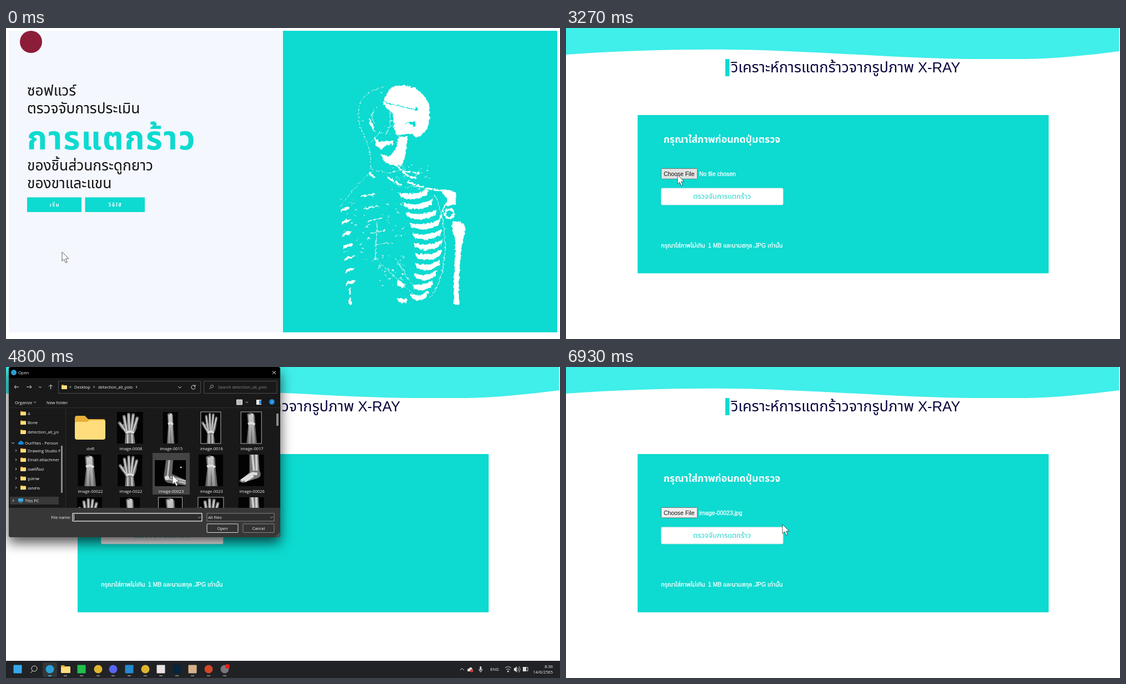
Recreate the animation shown at these times as an HTML page. Size 998 px wide and 561 px high, loop 6960 ms.

```html
<!DOCTYPE html>
<html lang="th">
<head>
<meta charset="utf-8">
<title>X-ray fracture check</title>
<style>
html, body { margin: 0; width: 100%; height: 100%; overflow: hidden; background: #fff; }
svg.stage { display: block; width: 100vw; height: 100vh; }
text { font-family: "Liberation Sans", "Noto Sans Thai", "Noto Sans", sans-serif; }
.ui text { font-family: "Open Sans", "Noto Sans Thai", "Noto Sans", sans-serif; font-size: 7.5px; fill: #f2f2f2; }
.mid { text-anchor: middle; }
.end { text-anchor: end; }
.teal { fill: #0ddad0; }
.line { fill: none; stroke: #ddd; stroke-width: 1; }
.bone { fill: none; stroke: #fff; stroke-linecap: round; }

/* Hard switches */
.cut { animation: 6960ms step-end infinite; }
#home { animation-name: home; }
#upload { animation-name: upload; }
#wave { animation-name: wave; }
#hover { animation-name: hover; }
#empty { animation-name: empty; }
#chosen { animation-name: chosen; }
#focus { animation-name: focus; }
#pick { animation-name: pick; }
#name { animation-name: name; }
#marked { animation-name: marked; }
#press { animation-name: press; }
#caption { animation-name: caption; }
#arrow { animation-name: arrow; }
#hand { animation-name: hand; }
#beam { animation-name: beam; }
@keyframes home { 0% { opacity: 1 } 21.55% { opacity: 0 } }
@keyframes upload { 0% { opacity: 0 } 21.55% { opacity: 1 } }
@keyframes wave { 0% { opacity: 0 } 31.03% { opacity: 1 } }
@keyframes hover { 0% { opacity: 0 } 40% { opacity: 1 } 51.7% { opacity: 0 } }
@keyframes empty { 0% { opacity: 1 } 93.1% { opacity: 0 } }
@keyframes chosen { 0% { opacity: 0 } 93.1% { opacity: 1 } }
@keyframes focus { 0% { opacity: 1 } 69% { opacity: 0 } }
@keyframes pick { 0% { opacity: 0 } 66% { opacity: .5 } 69% { opacity: 1 } 88% { opacity: .4 } }
@keyframes name { 0% { opacity: 0 } 69% { opacity: 1 } }
@keyframes marked { 0% { opacity: 0 } 88% { opacity: 1 } }
@keyframes press { 0% { opacity: 0 } 83.6% { opacity: 1 } }
@keyframes caption { 0% { opacity: 1 } 89.7% { opacity: 0 } }
@keyframes arrow { 0% { opacity: 1 } 12.6% { opacity: 0 } 31.03% { opacity: 1 } 52.6% { opacity: 0 } 63% { opacity: 1 } }
@keyframes hand { 0% { opacity: 0 } 12.6% { opacity: 1 } 31.03% { opacity: 0 } }
@keyframes beam { 0% { opacity: 0 } 52.6% { opacity: 1 } 63% { opacity: 0 } }

/* Smooth motion */
#cursor { animation: travel 6960ms ease-in-out infinite; }
#dialog { animation: dialog 6960ms linear infinite; transform-origin: 249px 153px; filter: drop-shadow(0 10px 11px rgba(0, 0, 0, .68)); }
#title { animation: title 6960ms step-end infinite; }
#taskbar { animation: taskbar 6960ms ease-out infinite; }
@keyframes travel {
  0%, 4.3% { transform: translate(101px, 404px) }
  13.6%, 31.03% { transform: translate(87px, 325px) }
  40.9%, 51.7% { transform: translate(201px, 265px) }
  56%, 62.1% { transform: translate(194px, 271px) }
  68.2%, 75% { transform: translate(300px, 195px) }
  79.3% { transform: translate(347px, 219px) }
  84%, 100% { transform: translate(390px, 284px) }
}
@keyframes dialog {
  0%, 51.72% { opacity: 0; transform: scale(.96) }
  53.5%, 89.7% { opacity: 1; transform: none }
  90.5% { opacity: .9; transform: scale(.996) }
  92.2%, 100% { opacity: 0; transform: scale(.96) }
}
@keyframes title { 0% { transform: none } 89.7% { transform: translateX(-12px) } }
@keyframes taskbar {
  0%, 50% { transform: translateY(32px) }
  51.5%, 88.6% { transform: none }
  90.4%, 92.1% { transform: translateY(30px) }
  92.2%, 100% { transform: translateY(32px) }
}
</style>
</head>
<body>
<svg class="stage" viewBox="0 0 998 561">
<defs>
  <filter id="rough" x="-5%" y="-5%" width="110%" height="110%" color-interpolation-filters="sRGB">
    <feTurbulence type="fractalNoise" baseFrequency=".2" numOctaves="3" seed="4"/>
    <feDisplacementMap in="SourceGraphic" scale="6" xChannelSelector="R" yChannelSelector="G"/>
  </filter>
  <linearGradient id="xray" x1="0" y1="0" x2="0" y2="57" gradientUnits="userSpaceOnUse">
    <stop offset="0" stop-color="#d0d0d0"/><stop offset="1" stop-color="#8d8d8d"/>
  </linearGradient>
  <clipPath id="files"><path d="M108 74H494V254H108Z"/></clipPath>
  <symbol id="folder" viewBox="0 0 55 43" preserveAspectRatio="none">
    <path d="M0 4Q0 0 4 0H18L24 6H51Q55 6 55 10V30H0Z" fill="#e9b03a"/>
    <path d="M0 14Q0 11 4 11H22L27 8H51Q55 8 55 12V39Q55 43 51 43H4Q0 43 0 39Z" fill="#ffdd7c"/>
  </symbol>
  <symbol id="xhand" viewBox="0 0 40 57" preserveAspectRatio="none">
    <path d="M12 57L13 39Q8 32 8 22L31 21Q31 32 26 39L28 57Z" fill="#777"/>
    <path d="M10 30L4 20M13 24L11 8M18 23L18 4M23 23L25 5M28 25L31 11" stroke="#777" stroke-width="5" stroke-linecap="round" fill="none"/>
    <path d="M16.500 57V41M23.500 57L23 41M13 34L5 21M15 34L11 9M19 33L18 5M22 33L25 6M25 34L31 12" stroke="#ccc" stroke-width="2.200" stroke-linecap="round" fill="none"/>
    <path d="M14 38Q20 33 26 38" stroke="#ddd" stroke-width="4" fill="none"/>
  </symbol>
  <symbol id="xarm" viewBox="0 0 40 57" preserveAspectRatio="none">
    <path d="M11 57L14 25L12 4Q20-2 27 6L28 26L31 57Z" fill="#666"/>
    <path d="M17 57L18 24L17 5M25 57L23 27L22 3" stroke="url(#xray)" stroke-width="5" fill="none"/>
    <path d="M14 22Q21 17 27 23" stroke="#ddd" stroke-width="4" fill="none"/>
  </symbol>
  <symbol id="xelbow" viewBox="0 0 56 47" preserveAspectRatio="none">
    <path d="M20 0H33L31 25L56 36V46L24 41Q14 37 17 23Z" fill="#666"/>
    <path d="M26 0L23 28M22 33L56 42M28 30L56 38" stroke="#bbb" stroke-width="3" fill="none"/>
    <circle cx="22" cy="32" r="4" fill="#ddd"/><circle cx="47" cy="13" r="1.5" fill="#ddd"/>
  </symbol>
  <symbol id="xfoot" viewBox="0 0 46 57" preserveAspectRatio="none">
    <path d="M20 0H36L38 29Q43 38 36 42L8 51L1 48L20 32Z" fill="#777"/>
    <path d="M25 0L28 29M32 0L33 29" stroke="#ccc" stroke-width="4" fill="none"/>
    <path d="M34 35L25 34L5 47M27 38L11 48" stroke="#ddd" stroke-width="5" fill="none"/>
  </symbol>
</defs>

<g id="home" class="cut">
  <path d="M5 5H499V549H5Z" fill="#f4f7fe"/>
  <path class="teal" d="M499 5H993V549H499Z"/>
  <circle cx="45" cy="25" r="20" fill="#8c1d39"/>
  <g font-size="26.3" fill="#111">
    <text x="38" y="122">ซอฟแวร์</text>
    <text x="38" y="154">ตรวจจับการประเมิน</text>
    <text class="teal" x="38" y="219" font-size="58" font-weight="700" letter-spacing="1.9">การแตกร้าว</text>
    <text x="38" y="257">ของชิ้นส่วนกระดูกยาว</text>
    <text x="38" y="289">ของขาและแขน</text>
  </g>
  <path class="teal" d="M38 305.5H136V332H38ZM142.500 305.5H250V332H142.500Z"/>
  <g class="mid" font-size="9" font-weight="700" letter-spacing="1.8" fill="#fff">
    <text x="88" y="322">เริ่ม</text><text x="197" y="322">วิธีใช้</text>
  </g>
  <g id="skeleton" filter="url(#rough)">
    <g fill="#fff">
      <path d="M681 128L692 110Q701 103 716 103Q750 107 761 137Q765 160 761 177Q752 194 738 198L731 188Q740 178 737 168Q722 168 712 180L700 184Q697 160 694 152Q686 146 679 137Z"/>
      <path d="M707 196L723 195Q723 226 713 247Q698 251 681 241L674 226L690 232Q704 222 707 196Z"/>
      <path d="M664 197L672 205L696 203L698 209L684 212L676 220L666 211ZM700 180L726 172L740 180L738 190L704 193Z"/>
      <path d="M653 162Q660 168 665 188L657 178Z"/>
      <path d="M784 293Q800 290 812 298L810 318L790 322L795 308Z"/>
      <path d="M804 350Q827 344 828 366Q822 382 820 402Q815 450 816 499H806Q807 450 809 402Q812 382 804 365Z"/>
      <path d="M705 455L719 463L716 469L704 464ZM705 486L722 489V496L706 494Z"/>
    </g>
    <path d="M681 134L735 147" stroke="#0ddad0" stroke-width="1.4"/>
    <circle cx="739" cy="146" r="3" class="teal"/>
    <circle cx="799" cy="335" r="8" class="bone" stroke-width="4"/>
    <g class="bone" stroke-width=".9">
      <path d="M682 107Q650 111 638 135Q631 160 640 183Q650 202 655 224L658 253" stroke-dasharray="5 3 2 3"/>
      <path d="M692 150Q696 180 683 192M662 150Q656 160 664 172M676 184Q668 194 658 206"/>
      <path d="M662 258Q640 272 622 296L604 320M657 254L690 262L718 254" stroke-dasharray="6 4"/>
      <path d="M772 300Q794 350 790 412Q785 462 764 486M669 350L665 418M672 422L742 488M705 420L735 470" stroke-dasharray="22 2"/>
    </g>
    <g class="bone" stroke-width="3">
      <path d="M703 248L722 266L739 271M716 258L748 263M724 278L752 288L788 294M688 270L712 284M655 262L663 269M790 320L780 350" stroke-dasharray="12 5"/>
      <path d="M620 470V497" stroke-width="4" stroke-dasharray="10 7"/>
    </g>
  </g>
</g>

<g id="upload" class="cut">
  <path d="M0 0H998V561H0Z" fill="#fff"/>
  <path id="wave" class="cut" d="M0 0H996.500V42C910 53 860 56 820 56H740C640 56 520 47 400 42C300 37 150 37 0 48Z" fill="#40eeea"/>
  <path class="teal" d="M287 56H294.500V87H287Z"/>
  <g fill="#09063f">
    <text x="297" y="80" font-size="27">วิเคราะห์การแตกร้าวจากรูปภาพ</text><text x="634" y="80" font-size="25.6">X-RAY</text>
  </g>
  <path class="teal" d="M129 157H869.500V442.500H129Z"/>
  <text class="mid" x="281" y="207" font-size="17.700" font-weight="700" fill="#fff">กรุณาใส่ภาพก่อนกดปุ่มตรวจ</text>
  <rect x="171.500" y="253.500" width="65" height="18.500" rx="1" fill="#efefef" stroke="#6b7474"/>
  <rect id="hover" class="cut" x="172" y="254" width="64" height="17.500" fill="#e2e2e2"/>
  <g font-size="10.4">
    <text x="176" y="266.500" fill="#111">Choose File</text>
    <g fill="#fff" stroke="#fff" stroke-width=".3">
      <text id="empty" class="cut" x="240" y="266.500">No file chosen</text>
      <text id="chosen" class="cut" x="240" y="266.500">image-00023.jpg</text>
      <text x="171" y="396" font-size="10.800">กรุณาใส่ภาพไม่เกิน</text><text x="256" y="396">1 MB</text>
      <text x="283" y="396" font-size="10.800">และนามสกุล</text><text x="337" y="396">.JPG</text>
      <text x="363" y="396" font-size="10.800">เท่านั้น</text>
    </g>
  </g>
  <rect x="171.500" y="289" width="219.500" height="30" rx="2" fill="#fff" stroke="#d5e7e7"/>
  <text class="mid" x="281" y="308" font-size="13.100" fill="#20d3cb">ตรวจจับการแตกร้าว</text>
</g>

<g id="taskbar" class="ui">
  <path d="M0 530H998V561H0Z" fill="#202225"/>
  <rect x="66" y="533" width="26" height="26" rx="3" fill="#34373a"/>
  <g id="apps"></g>
  <circle class="line" cx="51" cy="544" r="5" stroke-width="1.500"/><path class="line" d="M48 548L44 552" stroke-width="1.500"/>
  <use href="#folder" x="99" y="538" width="17" height="14"/>
  <circle cx="399" cy="540" r="4" fill="#f01818"/>
  <path class="line" d="M818 547L821.500 543.500L825 547M852 545Q852 549 855 549Q858 549 858 545M855 549V551M899 543Q904 538 910 543M901 546Q904 543 908 546M922 542Q924 545 922 549M924 540Q928 545 924 551"/>
  <rect x="853.500" y="540" width="3" height="7" rx="1.500" fill="#ddd"/>
  <path d="M831 548Q831 544 834 544Q837 539 840 544L841 549H832ZM915 543H917L920 540V551L917 548H915Z" fill="#ddd"/>
  <circle cx="839" cy="548" r="2.800" fill="#d83b3b"/><circle cx="904.500" cy="549" r="1.500" fill="#ddd"/>
  <rect class="line" x="932" y="542" width="8" height="6"/><path d="M931 541H937V549H931Z" fill="#ddd"/>
  <text class="mid" x="880" y="548">ENG</text>
  <text class="end" x="985" y="543">8:36</text><text class="end" x="985" y="553">14/6/2565</text>
</g>

<g id="dialog" class="ui">
  <rect x="5" y="0" width="489" height="307" rx="4" fill="#191919"/>
  <path d="M5 20V4Q5 0 9 0H490Q494 0 494 4V20Z" fill="#000"/>
  <path d="M5 254H494V303Q494 307 490 307H9Q5 307 5 303Z" fill="#373737"/>
  <g id="caption" class="cut">
    <circle cx="14" cy="10" r="5" fill="#2b9fd6"/>
    <path class="line" d="M480 7L486 13M486 7L480 13"/>
  </g>
  <text id="title" x="22" y="13">Open</text>
  <g class="line">
    <path d="M23 36H15M18 33L15 36L18 39M37 36H46M43 33L46 36L43 39M59 35L61.500 37.500L64 35M80.500 40V32M77 35.500L80.500 32L84 35.500M310 35L313 38L316 35M157.500 34L159.500 36L157.500 38M234 34L236 36L234 38"/>
    <path d="M340 34A3.600 3.600 0 1 0 341 37M341 32V35H338"/>
    <path d="M94.500 25.500H350.500V47.500H94.500ZM356.500 25.500H488V47.500H356.500Z" stroke="#4b4b4b"/>
    <circle cx="371" cy="35" r="2.500" stroke="#999"/><path d="M369 37L366 40" stroke="#999"/>
    <path d="M107.500 74V254M5 73.500H494" stroke="#2e2e2e"/>
    <path d="M50 62.500L52 64.500L54 62.500M432 62.500L434 64.500L436 62.500"/>
    <path d="M415.500 59H425.500V68H415.500Z" fill="#bbb"/>
  </g>
  <path d="M451 59H460V68H451Z" fill="#eee"/><path d="M456 60H460V67H456Z" fill="#2a8ad6"/>
  <circle cx="479" cy="63" r="5" fill="#1787d8"/><text class="mid" x="479" y="66">?</text>
  <use href="#folder" x="100" y="32" width="10" height="8"/>
  <text x="114" y="38">«</text><text x="123" y="39">Desktop</text><text x="166" y="39">detection_all_yolo</text>
  <text x="382" y="39" style="fill:#888">Search detection_all_yolo</text>
  <text x="16" y="66.500">Organize</text><text x="73" y="66.500">New folder</text>
  <path d="M7 234H95V248H7Z" fill="#383838"/>
  <g id="tree"></g>
  <path d="M23 140Q20 136 24 135.500Q26 131 30 135Q33 136 31 140Z" fill="#1689dc"/>
  <path d="M22 237H31V243H22ZM24 244H29V245H24Z" fill="#3ba5df"/>
  <text x="34" y="140">OurFiles - Person</text><text x="34" y="244">This PC</text>
  <path class="line" d="M10 136L12.500 138.500L15 136M12 239L14 241L12 243" stroke="#aaa"/>
  <path d="M99 142H102V227H99ZM487 84H491V106H487Z" fill="#8b8b8b"/>
  <path id="pick" class="cut" d="M264 155H331V230H264Z" fill="#707070"/>
  <g clip-path="url(#files)">
    <use href="#folder" x="124" y="88" width="55" height="43"/>
    <g id="shots"></g>
  </g>
  <text class="mid" x="152" y="150">ปกติ</text>
  <text class="end" x="117" y="273.500">File name:</text>
  <g class="line" stroke-width="1">
    <path d="M120 264H353V278H120ZM362 264H483V278H362Z" fill="#2d2d2d" stroke="#858585"/>
    <path d="M346 270L348.500 272.500L351 270M476 270L478.500 272.500L481 270" stroke="#aaa"/>
    <path id="focus" class="cut" d="M120 264H353V278H120ZM122.500 266V276" stroke="#fff"/>
    <rect x="362" y="283" width="56" height="15.500" rx="1" fill="#333" stroke="#e0e0e0"/>
    <rect id="press" class="cut" x="362" y="283" width="56" height="15.500" fill="#626262" stroke="#bbb"/>
    <rect x="427" y="283" width="56" height="15.500" rx="1" fill="#333" stroke="#888"/>
  </g>
  <path id="marked" class="cut" d="M121 266H168V276.500H121Z" fill="#0878d4"/>
  <text id="name" class="cut" x="121.500" y="273.500">image-00023</text>
  <text x="364" y="273.500">All files</text>
  <text class="mid" x="390" y="293.500">Open</text><text class="mid" x="455" y="293.500">Cancel</text>
  <path d="M487 305H493M490 302.500H493M492 300H493" stroke="#bbb" stroke-dasharray="1.500 1"/>
</g>

<g id="cursor">
  <path id="arrow" class="cut" d="M0 0V16.500L3.800 13L6.500 19.500L9.200 18.300L6.600 12H12Z" fill="#fff" stroke="#333" stroke-width=".8"/>
  <path id="hand" class="cut" d="M-1.300 9V1.200Q0-.7 1.300 1.200V6L6 7Q8 7.500 8 10V12L6.500 16.500H-.5L-4 10.500Q-4 8-1.300 10ZM3.300 6.500V9M5.500 7V9.500" fill="#fff" stroke="#333" stroke-width=".9"/>
  <path id="beam" class="cut" d="M-3-6H-1Q0-6 0-5Q0-6 1-6H3M0-5V6M-3 7H-1Q0 7 0 6Q0 7 1 7H3" fill="none" stroke="#fff" stroke-width="1.200"/>
</g>
</svg>
<script>
const add = (id, markup) => document.getElementById(id).insertAdjacentHTML("beforeend", markup);
let seed = 9;
const rand = () => (seed = seed * 16807 % 2147483647) / 2147483647;

// Rib cage: broad ribs on the right, broken ones on the left, loose specks.
let bones = "";
for (let i = 0; i < 11; i++) {
  const y = 299 + i * 18.3, bow = Math.sin((i + 1) / 12 * Math.PI);
  const x0 = 707 + 30 * Math.sin(i / 11 * 2.6), x1 = 752 + 34 * bow, mid = (x0 + x1) / 2;
  bones += `<path d="M${x0} ${y - 3}Q${mid} ${y + 5} ${x1} ${y - 9}L${x1 - 2} ${y + 1}Q${mid} ${y + 16} ${x0 + 3} ${y + 5}Z" fill="#fff"/>`;
}
for (let i = 0; i < 7; i++) {
  const y = 328 + i * 22, x = 603 + i * 1.6;
  bones += `<path d="M${x} ${y}q8-6 17-5l-4 5q-8 0-13 5z" fill="#fff"/>`;
  if (i < 5) bones += `<path d="M${640 + i * 6} ${y - 24}l24-5" class="bone" stroke-width="${2.5 - i * .4}"/>`;
}
const speck = (x, y, w, h, n) => {
  for (let i = 0; i < n; i++)
    bones += `<rect x="${x + rand() * w}" y="${y + rand() * h}" width="${1 + rand() * 3}" height="${.5 + rand()}" fill="#fff"/>`;
};
speck(600, 300, 60, 120, 45);
speck(660, 410, 55, 60, 45);
speck(690, 245, 75, 45, 40);
speck(640, 105, 55, 90, 12);
speck(665, 310, 55, 80, 24);
add("skeleton", bones);

// Plain marks for the pinned programs: x, colour, round?
const apps = [
  [21, "#35a9ef"], [79, "#2b9fd6", 1], [136, "#20bf4b"], [166, "#dfb52f", 1], [193, "#5865f2", 1],
  [222, "#2489ce"], [251, "#dfb52f", 1], [279, "#e8e3e5"], [308, "#06243c"], [336, "#d8b18a"],
  [365, "#d24726", 1], [394, "#77777b", 1]
];
add("apps", apps.map(([x, fill, round], i) =>
  `<rect x="${x - 7.5}" y="537.5" width="15" height="15" rx="${round ? 7.5 : 1}" fill="${fill}"/>` +
  (i ? `<path d="M${x - 3} 557h6" stroke="${i == 1 ? "#62c4f5" : "#999"}" stroke-width="1.5"/>` : "")).join("") +
  `<path d="M104 557h6" stroke="#999" stroke-width="1.5"/>`);

const tree = ["4", "Bone", "detection_all_yo", "", "Drawing Studio F", "Email attachmer", "เดสก์ท็อป", "รูปภาพ", "เอกสาร"];
add("tree", tree.map((label, i) => {
  const y = 86.5 + i * 16.75;
  return label && `<use href="#folder" x="26" y="${y - 7}" width="10" height="8"/><text x="39" y="${y}">${label}</text>` +
    (i > 3 ? `<path class="line" d="M17 ${y - 5}l2 2l-2 2" stroke="#aaa"/>` : "");
}).join(""));

// Thumbnails: column, row, width, shape, label, framed?
const shots = [
  [1, 0, 47, "hand", "image-0008"], [2, 0, 27, "arm", "image-0015"], [3, 0, 36, "hand", "image-0016", 1], [4, 0, 37, "arm", "image-0017", 1],
  [0, 1, 42, "arm", "image-00022"], [1, 1, 44, "hand", "image-0022"], [2, 1, 56, "elbow", "image-00023"], [3, 1, 44, "arm", "image-0023"], [4, 1, 46, "foot", "image-00026"],
  [0, 2, 45, "hand", ""], [1, 2, 36, "arm", ""], [2, 2, 43, "arm", "", 1], [3, 2, 46, "hand", "", 1], [4, 2, 46, "foot", ""]
];
add("shots", shots.map(([col, row, w, shape, label, framed]) => {
  const mid = 152 + col * 72.8, h = shape == "elbow" ? 47 : 57;
  const x = mid - 1.5 - w / 2, y = 138 + row * 77 - h;
  const box = `x="${x}" y="${y}" width="${w}" height="${h}"`;
  return `<rect ${box} fill="#030303" stroke="${framed ? "#ddd" : "none"}" stroke-width=".8"/><use href="#x${shape}" ${box}/>` +
    `<text class="mid" x="${mid}" y="${150 + row * 77}">${label}</text>`;
}).join(""));
</script>
</body>
</html>
```
